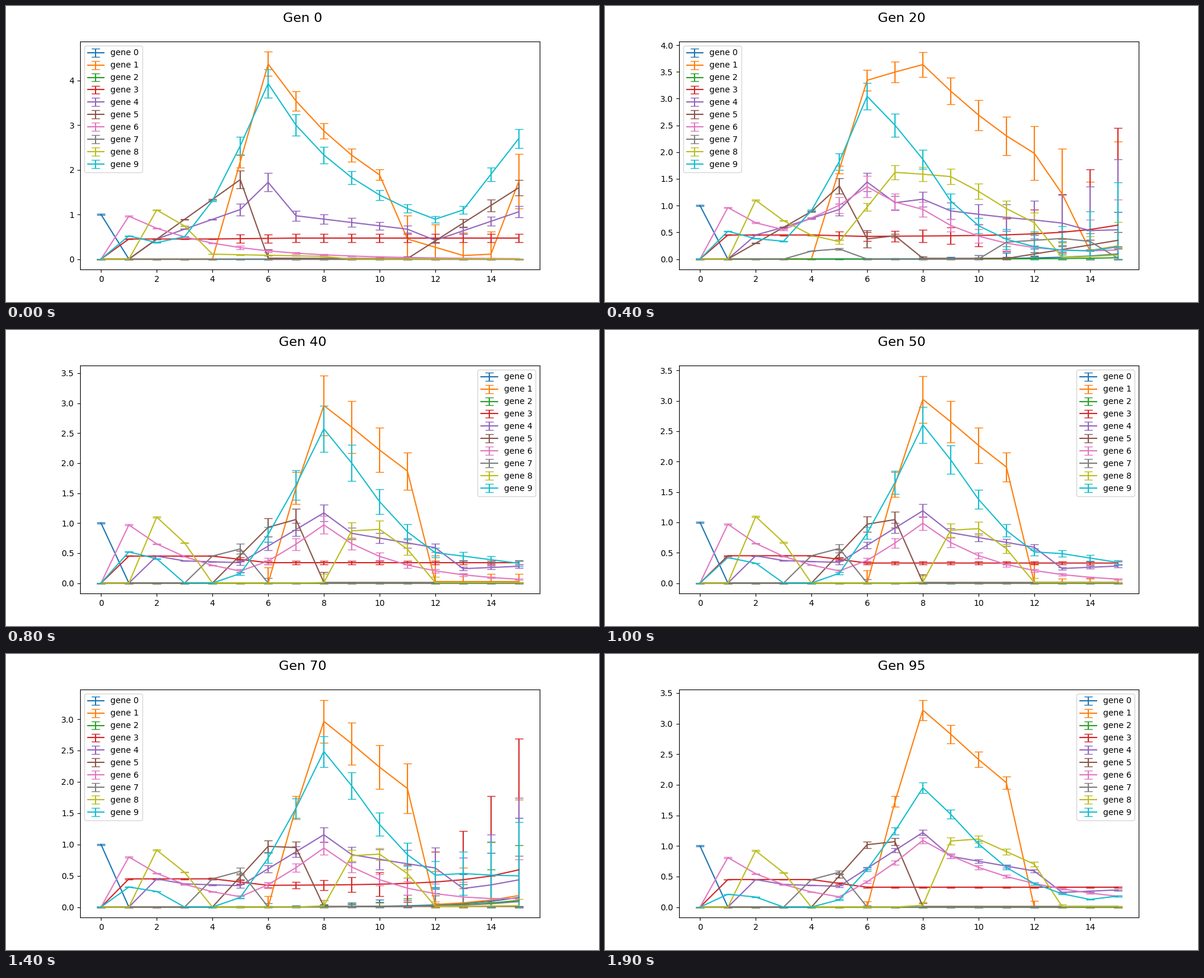
A matplotlib script for the animation above (2000 ms loop, 1000x500 px).

```python
import numpy as np
import matplotlib.pyplot as plt
from matplotlib.animation import FuncAnimation

GENES, STEPS = 10, 16
FRAMES, GEN_STEP = 20, 5
X = np.arange(STEPS)

# relative spread per gene, and size of the end-of-run noise per gene
EARLY_SPREAD = np.array([0, .05, 0, .2, .12, .11, .15, .2, .07, .08])
LATE_SPREAD = np.array([0, 1, 0, .5, .7, 1, .9, .9, 1, .9])
EARLY_NOISE = np.array([1.72, 4.7, .2, 4.2, 3.2, .35, 2.5, .05, 1.8, 3.2])
LATE_NOISE = np.array([1.27, 1.53, .88, 2.08, 1.29, 0, .62, .73, .1, .82])


def pulse(start, peak, top, rate, bend=1, rise=1, last=STEPS):
    """Climb from start to peak, then decay; off after step `last`."""
    up = np.clip((X - start) / (peak - start), 0, 1) ** rise
    down = np.exp(-rate * np.clip(X - peak, 0, None) ** bend)
    return np.where(X <= last, top * up * down, 0)


def path(steps, levels):
    return np.interp(X, steps, levels)


def spread_of(mean, rel):
    """Spread follows the mean; a silent step takes it from its neighbours."""
    padded = np.pad(mean, ((0, 0), (1, 1)))
    near = np.maximum(padded[:, :-2], padded[:, 2:])
    base = np.where(mean < .05, near, mean)
    return np.where(X >= 5, rel[:, None] * base, .01 * mean)


def early(gen):
    u = min(gen / 15, 1)

    def mix(a, b):
        return a + (b - a) * u

    m = np.zeros((GENES, STEPS))
    m[0, 0] = 1
    m[1] = pulse(4, 6, mix(4.37, 5.01), mix(.21, .157), last=round(mix(10, 13)))
    m[1] += (1 - u) * path([10, 11, 13, 14, 15], [0, .45, .08, .11, 1.74])
    m[3] = path([0, 1, 4, 7], [0, .45, .45, .47])
    m[4] = path([1, 2, 5, 6, 7, 11, 12, 15],
                [0, .45, mix(1.11, 1.22), mix(1.72, 1.82), mix(.97, 1.07),
                 mix(.67, .78), mix(.42, .72), mix(1.06, .45)])
    m[5] = path([1, 5, 6, 11, 15], [0, 1.78, .02, .01, mix(1.6, .5)])
    m[6] = np.maximum(pulse(0, 1, .96, .33), u * pulse(1.5, 6, 1.81, .4))
    m[7] = u * path([10, 11, 13, 14, 15], [0, .47, .57, .48, 0])
    m[8] = np.maximum(path([1, 2, 3, 4, 8, 9], [0, 1.1, .74, mix(.11, .45), .06, 0]),
                      u * pulse(4.5, 7, 2.43, .14, bend=1.45, last=12))
    m[9] = np.maximum(path([0, 1, 2, 3, 4], [0, .52, .37, .5, 0]),
                      pulse(2.5, 6, mix(3.93, 4.09), mix(.27, .38),
                            bend=mix(.95, 1.6), rise=1.3))
    m[9] = np.maximum(m[9], (1 - u) * path([11, 13, 15], [0, 1.1, 2.7]))

    rel = EARLY_SPREAD.copy()
    rel[1] = mix(.062, .038)
    e = spread_of(m, rel)
    e[1, 11:] += .5 * (1 - u)
    return m, e


def late(gen):
    def along(*levels):
        return np.interp(gen, [30, 40, 60, 70, 95], levels)

    last = 12 if gen < 35 else 11
    last8 = 11 if 35 < gen < 85 else 12
    m = np.zeros((GENES, STEPS))
    m[0, 0] = 1
    tail = along(.08, .025, 0, 0, 0)
    m[1] = pulse(6, 8, along(3.57, 2.96, 3.09, 2.96, 3.22), .13, bend=1.15,
                 rise=.9, last=last) + tail * (X > last)
    m[3] = path([0, 1, 4, 6], [0, .45, .45, along(.335, .34, .32, .345, .325)])
    m[4] = path([1, 2, 3, 5, 8, 9, last + 1, last + 2, 15],
                [0, .45, .37, .34, along(1.35, 1.17, 1.21, 1.15, 1.22), .83,
                 .59, .24, .28])
    m[5] = path([4, 6, 7, 8], [0, along(1.09, .93, 1.01, .97, 1.02),
                               along(1.27, 1.06, 1.03, .95, 1.07), .01])
    m[6] = np.maximum(pulse(0, 1, along(.97, .97, .97, .8, .81), .395),
                      pulse(4, 8, along(1.15, .97, 1, .94, 1.09),
                            along(.39, .39, .39, .39, .26), rise=1.4))
    m[7] = path([3, 4, 5, 6], [0, .45, .57, 0])
    top = along(1.1, 1.1, 1.09, .91, .92)
    m[8] = path([1, 2, 3, 4, 5], [0, top, .61 * top, along(.44, 0, 0, 0, 0), 0])
    top = along(1.3, .87, .87, .82, 1.08)
    m[8] += path([7, 8, 9, 10, last8, last8 + 1],
                 [0, along(.53, .01, .02, .02, .03), top, 1.03 * top, .65 * top, .01])
    first = along(.52, .52, .32, .32, .21)
    m[9] = np.maximum(path([0, 1, 2, 3], [0, first, .78 * first, 0]),
                      pulse(4.6, 8, along(3, 2.57, 2.64, 2.48, 1.95), .25,
                            bend=1.35, rise=1.3))
    m[9] = np.maximum(m[9], path([11, 13, 15], [0, along(.15, .45, .52, .5, .07),
                                                along(.25, .33, .35, .4, .18)]))

    e = spread_of(m, LATE_SPREAD * along(.0755, .167, .088, .1, .052))
    e[1] += 5 * tail * (X > last)
    return m, e


def state(gen):
    w = np.clip((gen - 15) / 15, 0, 1)
    (m0, e0), (m1, e1) = early(gen), late(gen)
    # noise flares up around two generations and grows towards the last step
    flare = sum(max(0, 1 - abs(gen - c) / 10) for c in (15, 70))
    size = EARLY_NOISE + (LATE_NOISE - EARLY_NOISE) * w
    noise = flare * size[:, None] * 1.65 ** (X - 15.0)
    m = m0 + (m1 - m0) * w + .12 * noise
    e = e0 + (e1 - e0) * w + noise
    return m, e


fig, ax = plt.subplots(figsize=(10, 5), dpi=100)
title = fig.suptitle("", fontsize=16, y=.978)


def draw(frame):
    gen = frame * GEN_STEP
    m, e = state(gen)
    ax.clear()
    for k in range(GENES):
        # error bars never reach below zero
        ax.errorbar(X, m[k], yerr=[np.minimum(e[k], m[k]), e[k]],
                    capsize=5, label=f"gene {k}")
    ax.legend(loc="best")
    title.set_text(f"Gen {gen}")


anim = FuncAnimation(fig, draw, frames=FRAMES, init_func=lambda: None,
                     interval=100, repeat=True, repeat_delay=0)
plt.show()
```
